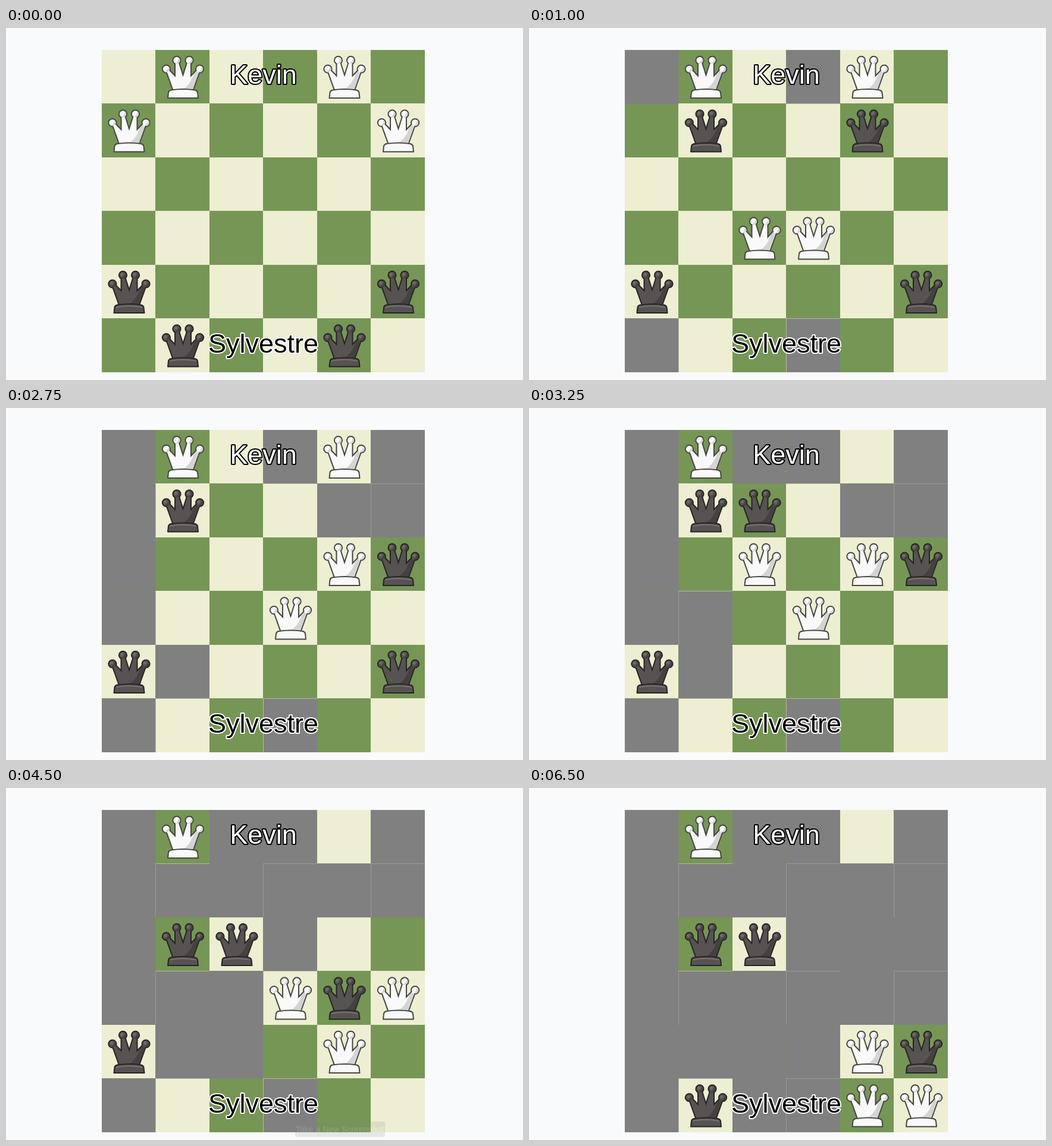
These frames come from a looping animation (869x593 px, 6.75 s). An HTML page:

```html
<!DOCTYPE html>
<html lang="en">
<head>
<meta charset="utf-8">
<title>Game of the Amazons</title>
<style>
  html, body { margin: 0; width: 100%; height: 100%; overflow: hidden; background: #f8fafc; }
  svg { display: block; width: 100%; height: 100%; }
  .white { --fill: #f9f9f9; --shade: #d4d4d5; --line: #454641; --orb: #f9f9f9; --rim: #f9f9f9; }
  .black { --fill: #575352; --shade: #454140; --line: #262424; --orb: #6d6a68; --rim: #7d7977; }
  .name { font: 45px "Liberation Sans", Arial, sans-serif; text-anchor: middle;
          paint-order: stroke; stroke-width: 4; stroke-linejoin: round; }
  .tip { font: 14px "Liberation Sans", Arial, sans-serif; text-anchor: middle; }
</style>
</head>
<body>
<svg viewBox="0 0 869 593">
  <defs>
    <g id="crown">
      <path d="M18 34L30.5 69H61.5L74 34H70L58.5 46L58.5 20H54L46 45.5L38 20H33.5L33.5 46L22 34Z"/>
      <circle cx="17.9" cy="32" r="5.6"/>
      <circle cx="35.5" cy="17.4" r="5.6"/>
      <circle cx="56.5" cy="17.4" r="5.6"/>
      <circle cx="74.1" cy="32" r="5.6"/>
    </g>
    <g id="gloss">
      <path d="M3.6 -4.2A5.6 5.6 0 0 1 -2.5 5Q3 2.5 3.6 -4.2Z" fill="var(--shade)"/>
      <circle cx="-1.5" cy="-1.5" r="2.6" fill="var(--orb)"/>
    </g>
    <g id="queen">
      <use href="#crown" fill="none" stroke="var(--line)" stroke-width="4" stroke-linejoin="round"/>
      <use href="#crown" fill="var(--fill)"/>
      <path d="M72 39.5L61.5 69H41Q58 61 64 41L69 35Z" fill="var(--shade)"/>
      <use href="#gloss" x="17.9" y="32"/>
      <use href="#gloss" x="35.5" y="17.4"/>
      <use href="#gloss" x="56.5" y="17.4"/>
      <use href="#gloss" x="74.1" y="32"/>
      <path d="M20.5 81L21.5 71.5Q22 68.5 26 67.5Q46 64.5 66 67.5Q70 68.5 70.5 71.5L71.5 81Z"
            fill="var(--fill)" stroke="var(--line)" stroke-width="2" stroke-linejoin="round"/>
      <path d="M24 71.5Q46 67 68 71.5" fill="none" stroke="var(--rim)" stroke-width="1.6"/>
    </g>
  </defs>
  <rect x="161" y="37" width="543" height="543" fill="#eeeed2"/>
  <g id="squares"></g>
  <g id="pieces"></g>
  <text class="name" x="432.5" y="94" fill="#fff" stroke="#000">Kevin</text>
  <text class="name" x="432.5" y="547" fill="#000" stroke="#fff">Sylvestre</text>
  <g id="tip" opacity="0.16">
    <rect x="486" y="562" width="151" height="26" rx="3" fill="#808878"/>
    <text class="tip" x="561" y="580" fill="#fff">Take a New Screenshot</text>
  </g>
</svg>
<script>
const CELL = 90.5, LEFT = 161, TOP = 37, STEP = 250, STEPS = 27;
const $ = id => document.getElementById(id);

// Each move: column and row of start, of destination, and of the burnt square.
const moves = `012305 151100 513335 454130 231303 415150 131201 514251 123214
  425241 324202 542120 402213 524332 222423 212221 425331 111211 244424
  041504 535553 434252 443425 424342 334433 435443 344534`.split(/\s+/);

const at = ([c, r]) => ({ x: LEFT + c * CELL, y: TOP + r * CELL });

function square(pos, color, snap = v => v) {
  const { x, y } = at(pos), left = snap(x), top = snap(y);
  const width = snap(x + CELL) - left, height = snap(y + CELL) - top;
  return `<rect x="${left}" y="${top}" width="${width}" height="${height}" fill="${color}"/>`;
}

function queen(pos, side) {
  const { x, y } = at(pos);
  return `<use href="#queen" class="${side}" x="${x}" y="${y}"/>`;
}

// The board lies on whole pixels; burnt squares keep their soft half-pixel edges.
let board = "";
for (let i = 0; i < 36; i++) {
  const c = i % 6, r = (i - c) / 6;
  if ((c + r) % 2) board += square([c, r], "#769656", Math.floor);
}

function draw(step) {
  // One step holds two moves.
  const played = moves.slice(0, step > 16 ? step + 1 : step);
  const queens = { white: ["10", "40", "01", "51"], black: ["04", "54", "15", "45"] };
  let burnt = "";
  played.forEach((move, i) => {
    const side = queens[i % 2 ? "black" : "white"];
    side[side.indexOf(move.slice(0, 2))] = move.slice(2, 4);
    burnt += square(move.slice(4), "#808080");
  });
  $("squares").innerHTML = board + burnt;
  $("pieces").innerHTML = Object.entries(queens)
    .map(([side, list]) => list.map(pos => queen(pos, side)).join("")).join("");
  $("tip").style.display = step === 18 ? "" : "none";
}

let shown = -1;
const start = performance.now();
function tick() {
  const step = Math.floor((performance.now() - start) / STEP) % STEPS;
  if (step !== shown) draw(shown = step);
  requestAnimationFrame(tick);
}
tick();
</script>
</body>
</html>
```
